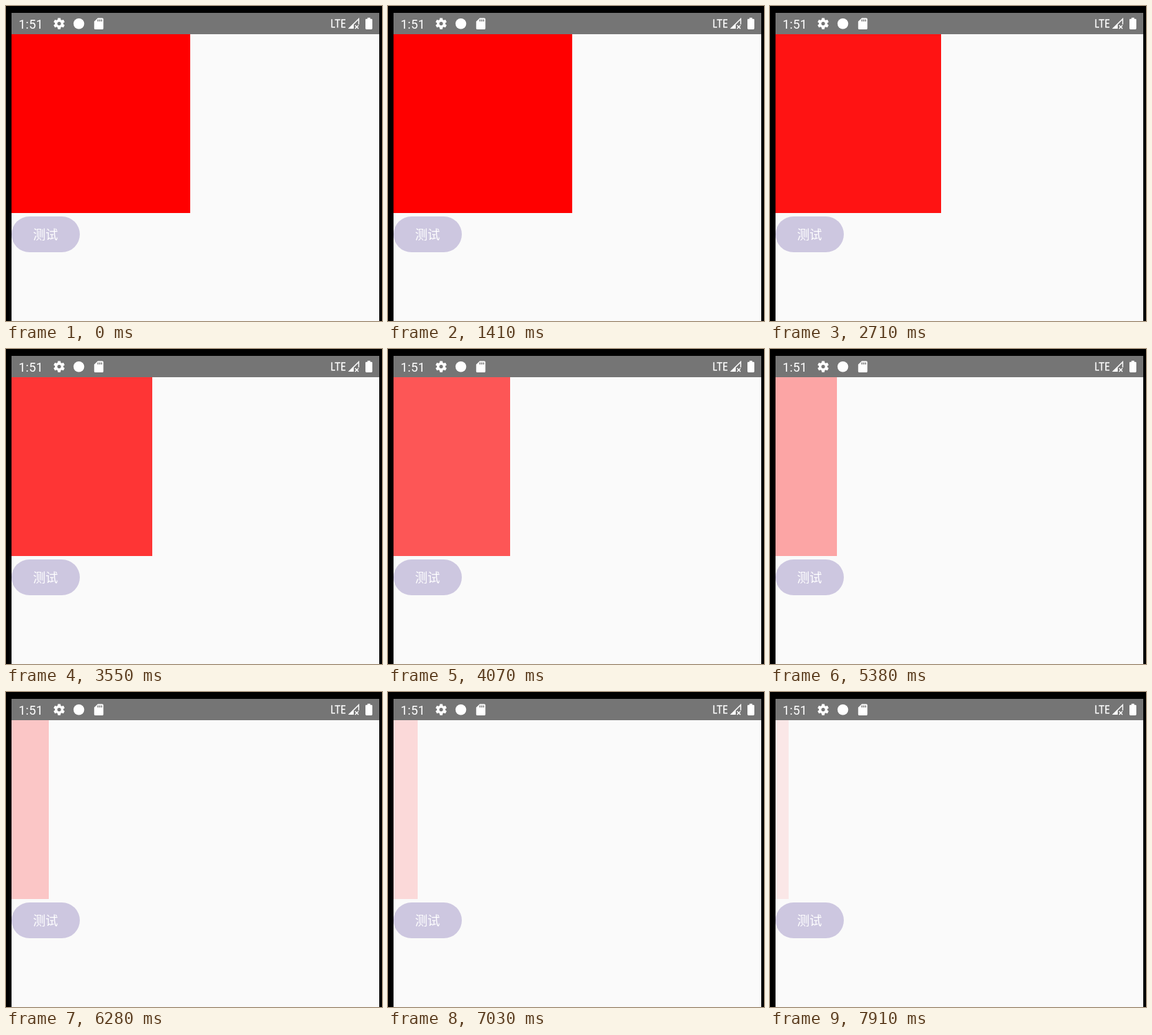
Recreate the animation shown at these times as an HTML page. Size 545x458 px, loop 8 s.

```html
<!DOCTYPE html>
<html lang="zh-CN">
<head>
<meta charset="utf-8">
<title>Shrink and fade</title>
<style>
  html, body { margin: 0; width: 100%; height: 100%; overflow: hidden; background: #000; }
  #screen { position: absolute; left: 8px; top: 10px; width: 533px; height: 448px; background: #fafafa; }
  #box { position: absolute; left: 8px; top: 41px; width: 259px; height: 260px; background: #f00; }
  svg { position: absolute; left: 0; top: 0; display: block; }
  .clock { font: 18px Roboto, sans-serif; letter-spacing: .2px; }
  .label { font: 18px "Noto Sans CJK SC", "Noto Sans CJK", sans-serif; text-anchor: middle; }
</style>
</head>
<body>
<div id="screen"></div>
<div id="box"></div>
<svg width="545" height="458" viewBox="0 0 545 458" fill="#fff">
  <rect x="8" y="10" width="533" height="31" fill="#757575"/>
  <text class="clock" x="18.3" y="33">1:51</text>

  <!-- settings -->
  <path transform="translate(66.9 15.4) scale(.845)" d="M19.14 12.94c.04-.3.06-.61.06-.94 0-.32-.02-.64-.07-.94l2.03-1.58c.18-.14.23-.41.12-.61l-1.92-3.32c-.12-.22-.37-.29-.59-.22l-2.39.96c-.5-.38-1.03-.7-1.62-.94l-.36-2.54c-.04-.24-.24-.41-.48-.41h-3.84c-.24 0-.43.17-.47.41l-.36 2.54c-.59.24-1.13.57-1.62.94l-2.39-.96c-.22-.08-.47 0-.59.22L2.74 8.87c-.12.21-.08.47.12.61l2.03 1.58c-.05.3-.09.63-.09.94s.02.64.07.94l-2.03 1.58c-.18.14-.23.41-.12.61l1.92 3.32c.12.22.37.29.59.22l2.39-.96c.5.38 1.03.7 1.62.94l.36 2.54c.05.24.24.41.48.41h3.84c.24 0 .44-.17.47-.41l.36-2.54c.59-.24 1.13-.56 1.62-.94l2.39.96c.22.08.47 0 .59-.22l1.92-3.32c.12-.22.07-.47-.12-.61zM12 15.1a3.1 3.1 0 1 1 0-6.2 3.1 3.1 0 0 1 0 6.2z"/>
  <circle cx="105.6" cy="25.7" r="7.8"/>

  <!-- memory card -->
  <path fill-rule="evenodd" d="M133 17.5h6.6q1.6 0 1.6 1.6v13.3q0 1.6-1.6 1.6h-10.2q-1.6 0-1.6-1.6V22.6zM132.6 19.4v3.2h1.5v-3.2zM135.2 19.4v3.2h1.5v-3.2zM137.8 19.4v3.2h1.5v-3.2z"/>

  <!-- network -->
  <path fill="none" stroke="#fff" stroke-width="1.6" d="M472.3 19.2V30.7H477M476.6 20H484.6M480.6 20V31.5M492 20H486.8V30.7H492M486.8 25.2H491.5"/>
  <path fill-rule="evenodd" d="M495.8 33L512 17V26.8H510.6V20.4L504 27V33z"/>
  <path fill="none" stroke="#fff" stroke-width="1.4" d="M505.9 28L510.9 33M510.9 28L505.9 33"/>

  <!-- battery -->
  <path d="M524 17h4v1.8h1.6q1.4 0 1.4 1.4v12.4q0 1.4-1.4 1.4h-7.2q-1.4 0-1.4-1.4V20.2q0-1.4 1.4-1.4H524z"/>

  <rect x="8" y="306" width="99" height="52" rx="26" fill="#cdc7e0"/>
  <text class="label" x="57.3" y="338.8">测试</text>
</svg>
<script>
  const LOOP = 8000;
  const shrink = document.getElementById('box').animate(
    [{ width: '259px', opacity: 1 }, { width: '0px', opacity: 0 }],
    { delay: 1150, duration: 10000, easing: 'cubic-bezier(.4, 0, .2, 1)', fill: 'both' }
  );
  shrink.pause();

  const start = performance.now();
  function tick() {
    shrink.currentTime = (performance.now() - start) % LOOP;
    requestAnimationFrame(tick);
  }
  tick();
</script>
</body>
</html>
```
